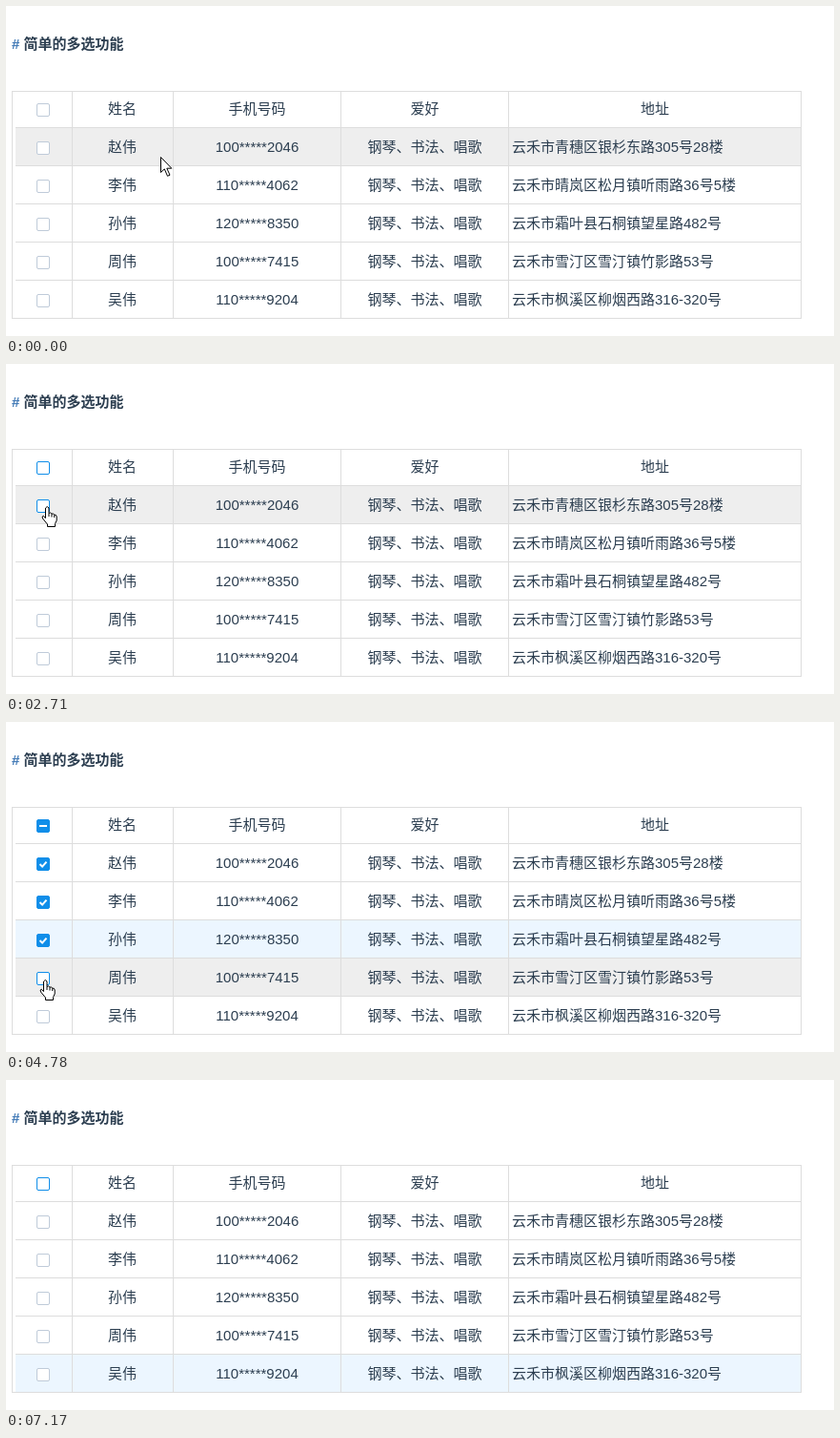
Recreate the animation shown at these times as an HTML page. Size 869x346 px, loop 7520 ms.

```html
<!DOCTYPE html>
<html lang="zh-CN">
<head>
<meta charset="utf-8">
<style>
html, body { margin: 0; width: 100%; height: 100%; overflow: hidden; background: #fff; }
svg { display: block; font: 15px "Liberation Sans", "Noto Sans CJK SC", "Noto Sans CJK", sans-serif; fill: #2c3e50; }
.title { font-weight: bold; }
.hash { fill: #3f78b5; }
.mid { text-anchor: middle; }
.grid { stroke: #ddd; fill: none; shape-rendering: crispEdges; }
.tick { fill: none; stroke: #fff; stroke-width: 2; }
.cursor { fill: #fff; stroke: #000; stroke-linejoin: round; }
</style>
</head>
<body>
<svg width="869" height="346">
  <g id="bands"></g>
  <path class="grid" d="M6 89.5H835M6.5 89V328M69.5 89V328M175.5 89V328M351.5 89V328M527.5 89V328M834.5 89V328
    M10 127.5H835M10 167.5H835M10 207.5H835M10 247.5H835M10 287.5H835M6 327.5H835"/>
  <text class="title" x="6" y="45"><tspan class="hash">#</tspan> 简单的多选功能</text>
  <g id="cells"></g>
  <g id="boxes"></g>
  <path id="cursor" class="cursor"/>
</svg>
<script>
const LOOP = 7520, BLUE = '#108ee9';
const $ = id => document.getElementById(id);

const people = [
  ['赵伟', '100*****2046', '云禾市青穗区银杉东路305号28楼'],
  ['李伟', '110*****4062', '云禾市晴岚区松月镇听雨路36号5楼'],
  ['孙伟', '120*****8350', '云禾市霜叶县石桐镇望星路482号'],
  ['周伟', '100*****7415', '云禾市雪汀区雪汀镇竹影路53号'],
  ['吴伟', '110*****9204', '云禾市枫溪区柳烟西路316-320号'],
];

const shapes = {
  arrow: 'M.5 .5V16.5L4.3 12.9L7.5 20.3L10 19.2L6.8 12.2H11.8Z',
  hand: 'M4.5 2Q6.2 -1 8 2V7.5Q9.7 6 11 8.2Q12.7 7 13.7 9.2Q15.7 8.5 16.2 11V15L14.5 18.5V21.5H6.5V19' +
    'L1.5 13Q.3 10.3 2.3 10.3L4.5 12.5ZM8 7.5V11M11 8.2V11.5M13.7 9.2V12',
};

// Box codes: 0 empty, b focused, 1 checked, - partial, f filled, s small tick, m fading out
// [start, pointer, x, y, hovered row, current row, boxes from the header down]
const scenes = [
  [0, 'arrow', 162, 158, 1, 0, '000000'],
  [330, 'arrow', 60, 127, 1, 0, '000000'],
  [670, 'hand', 33, 106, 0, 0, 'b00000'],
  [1370, 'hand', 32, 128, 1, 0, '111111'],
  [1680, 'hand', 33, 111, 0, 0, '111111'],
  [2030, 'hand', 34, 111, 0, 0, 'mmmmmm'],
  [2380, 'arrow', 46, 178, 2, 0, 'b00000'],
  [2710, 'hand', 37, 149, 1, 0, 'bb0000'],
  [3060, 'hand', 37, 149, 1, 0, '0b0000'],
  [3390, 'hand', 32, 183, 2, 1, '-fb000'],
  [3750, 'hand', 31, 191, 2, 1, '-1b000'],
  [4100, 'hand', 30, 233, 3, 2, '-11b00'],
  [4430, 'hand', 33, 247, 0, 3, '-11b00'],
  [4780, 'hand', 35, 270, 4, 3, '-111b0'],
  [5120, 'hand', 33, 300, 5, 4, '-111bb'],
  [5460, 'hand', 33, 303, 5, 4, '-1111b'],
  [5800, 'arrow', 50, 177, 2, 5, '111111'],
  [6160, 'hand', 38, 106, 0, 5, 'ssssss'],
  [6490, 'hand', 39, 106, 0, 5, '111111'],
  [6850, 'arrow', 50, 201, 2, 5, 'b00000'],
  [7170, '', 0, 0, 0, 5, 'b00000'],
];

const label = (text, x, y, cls = 'mid') => `<text class="${cls}" x="${x}" y="${y}">${text}</text>`;

function tableRow([name, phone, address], y, hobby, header) {
  return label(name, 122, y) + label(phone, 263.5, y) + label(hobby, 439.5, y) +
    (header ? label(address, 681, y) : label(address, 531, y, ''));
}

$('cells').innerHTML = tableRow(['姓名', '手机号码', '地址'], 113, '爱好', true) +
  people.map((person, i) => tableRow(person, 153 + 40 * i, '钢琴、书法、唱歌')).join('');

const band = (row, color) => row ? `<rect x="10" y="${88 + 40 * row}" width="824" height="39" fill="${color}"/>` : '';

function checkbox(code, row) {
  const fill = '0b'.includes(code) ? '#fff' : code === 'm' ? '#88c7f4' : BLUE;
  const tick = scale => `<path class="tick" d="M3.5 7L6.1 9.6L10.5 4.6" transform="translate(7 7) scale(${scale}) translate(-7 -7)"/>`;
  const marks = { 1: tick(1), s: tick(0.5), '-': '<rect x="3" y="6" width="8" height="2" fill="#fff"/>' };
  return `<g transform="translate(32 ${102 + 40 * row})">
    <rect x=".5" y=".5" width="13" height="13" rx="1.5" fill="${fill}" stroke="${code === '0' ? '#bfcbd9' : BLUE}"/>
    ${marks[code] || ''}</g>`;
}

function draw([, pointer, x, y, hovered, current, boxes]) {
  $('bands').innerHTML = band(current, '#ecf6ff') + band(hovered, '#eee');
  $('boxes').innerHTML = [...boxes].map(checkbox).join('');
  $('cursor').setAttribute('d', shapes[pointer] || '');
  $('cursor').setAttribute('transform', `translate(${x} ${y})`);
}

let shown;
function tick() {
  const time = performance.now() % LOOP;
  const scene = scenes.findLast(([start]) => start <= time);
  if (scene !== shown) draw(shown = scene);
  requestAnimationFrame(tick);
}
tick();
</script>
</body>
</html>
```
